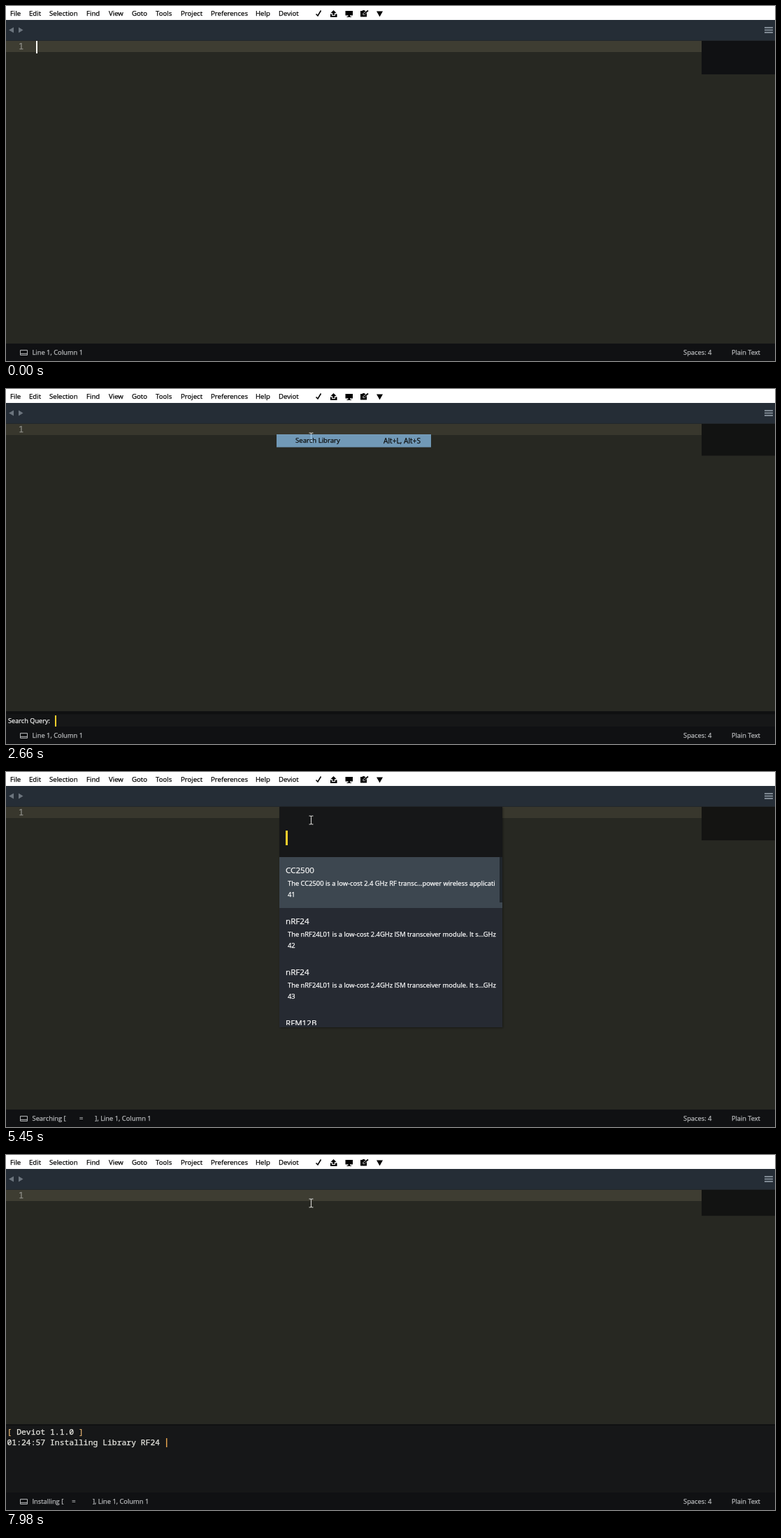
Recreate the animation shown at these times as an HTML page. Size 1100 by 509 pixels, loop 8000 ms.

```html
<!DOCTYPE html>
<html lang="en">
<head>
<meta charset="utf-8">
<title>Library search</title>
<style>
  html, body { margin: 0; width: 100%; height: 100%; overflow: hidden; background: #272822; }
  svg { display: block; width: 1100px; height: 509px; }
  text { font-family: "Open Sans", "Noto Sans", sans-serif; white-space: pre; stroke-width: .25px; }
  .mono { font-family: "Noto Sans Mono", "DejaVu Sans Mono", monospace; }
</style>
</head>
<body>
<svg id="stage" viewBox="0 0 1100 509" xmlns="http://www.w3.org/2000/svg">
  <defs>
    <filter id="shadow" x="-10%" y="-10%" width="120%" height="120%">
      <feDropShadow dx="1" dy="1" stdDeviation="1.5" flood-opacity=".4"/>
    </filter>
    <clipPath id="listClip"><rect x="391" y="122" width="311" height="241"/></clipPath>
  </defs>
</svg>
<script>
const LOOP = 8000;
const stage = document.getElementById('stage');

function add(parent, tag, attrs = {}, content) {
  const node = document.createElementNS('http://www.w3.org/2000/svg', tag);
  set(node, attrs);
  if (content !== undefined) node.textContent = content;
  parent.appendChild(node);
  return node;
}
function set(node, attrs) {
  for (const key in attrs) node.setAttribute(key, attrs[key]);
}
const group = (parent, attrs) => add(parent, 'g', attrs);
const rect = (parent, x, y, width, height, fill, more) =>
  add(parent, 'rect', { x, y, width, height, fill, ...more });
const path = (parent, d, attrs) => add(parent, 'path', { d, ...attrs });
// Text is placed by the middle of its capitals; a hairline in its own colour firms it up.
const label = (parent, x, mid, str, size, fill, more) =>
  add(parent, 'text', { x, y: mid + size * 0.36, 'font-size': size, fill, stroke: fill, ...more }, str);
const span = (parent, str, fill, more) => add(parent, 'tspan', { fill, stroke: fill, ...more }, str);

// Editor
rect(stage, 0, 20, 1100, 30, '#252d36');
rect(stage, 0, 49, 1100, 1, '#22272b');
rect(stage, 0, 50, 1100, 434, '#272822');
const activeLine = rect(stage, 0, 50, 1100, 16, '#3e3d32');
label(stage, 18, 58, '1', 12, '#90908a', { class: 'mono' });
const caret = rect(stage, 43, 50, 2, 18, '#f8f8f2');
const minimap = rect(stage, 995, 50, 105, 48, '#101113');
path(stage, 'M11 30.5V38.5L4 34.5ZM18 30.5V38.5L24.5 34.5Z', { fill: '#6c757e' });
path(stage, 'M1085 31H1097M1085 34.5H1097M1085 38H1097', { stroke: '#7f8993', 'stroke-width': 2 });

// Menu bar
rect(stage, 0, 0, 1100, 20, '#fff');
const hover = rect(stage, 384.5, 3.5, 40, 15.5, '#cce8ff', { stroke: '#99d1ff' });
const BAR = { File: 6, Edit: 33, Selection: 62, Find: 115, View: 147, Goto: 180, Tools: 214,
  Project: 250, Preferences: 293, Help: 357, Deviot: 390 };
for (const name in BAR) label(stage, BAR[name], 11, name, 9.6, '#000');
path(stage, 'M443.5 11.5L446 14L450.5 6.5', { fill: 'none', stroke: '#000', 'stroke-width': 1.6 });
path(stage, 'M468.5 6L472.5 10H470V13H467V10H464.5ZM464 11.5H466V14H471V11.5H473.5V16H464Z');
path(stage, 'M485.5 7H496V13.5H492V15H494V16H487.5V15H489.5V13.5H485.5Z');
path(stage, 'M507 7H510V6H513V7H516V15.5H507Z');
path(stage, 'M511 12.5L518 6', { stroke: '#fff', 'stroke-width': 3 });
path(stage, 'M511.5 12L518 6.5', { stroke: '#000', 'stroke-width': 1.8 });
path(stage, 'M530 7.5H539L534.5 15.5Z');

// Bottom panels
const UI = 9.35;
const queryPanel = group(stage);
rect(queryPanel, 0, 462, 1100, 24, '#131415');
rect(queryPanel, 0, 462, 1100, 4, '#0f1011');
rect(queryPanel, 67, 467, 1033, 17, '#161718');
label(queryPanel, 3, 475.5, 'Search Query:', 9.2, '#f0f0f0');
const queryText = label(queryPanel, 71, 476, '', 11.6, '#e4e4e4', { class: 'mono' });
const queryCaret = rect(queryPanel, 70, 468, 2, 16, '#ffcf2b');

const consolePanel = group(stage);
rect(consolePanel, 0, 386, 1100, 98, '#161718');
rect(consolePanel, 0, 386, 1100, 2, '#101112');
const MONO = { class: 'mono' };
const header = label(consolePanel, 1.5, 397, '', 11.4, '#e8e8e2', MONO);
span(header, '[', '#e6b673');
span(header, ' Deviot 1.1.0 ', '#e8e8e2');
span(header, ']', '#e6b673');
const logLine = group(consolePanel);
label(logLine, 1.5, 412, '01:24:57 Installing Library RF24 ', 11.4, '#e8e8e2', MONO);
rect(logLine, 229, 406, 1.5, 13, '#e0a04c');

// Status bar
rect(stage, 0, 484, 1100, 25, '#101113');
path(stage, 'M20.5 493.5H30.5V500.5H20.5ZM20.5 498.5H30.5', { fill: 'none', stroke: '#b4b6b8' });
const status = label(stage, 37.5, 497, '', UI, '#b9bbbd');
label(stage, 969, 497, 'Spaces: 4', UI, '#b9bbbd');
label(stage, 1038, 497, 'Plain Text', 9.2, '#b9bbbd');

// Drop-down menu: [middle, name, shortcut or '>' for a submenu, disabled]
const MENU = [
  [30.5, 'Select board(s)', '>'], [49, 'Select Environment', '', true],
  [74, 'Search Library', 'Alt+L, Alt+S'], [92.5, 'Remove Library', 'Alt+L, Alt+R'],
  [111.5, 'Import Library', '>'], [130, 'Examples', '>'], [149, 'Library Options', '>'],
  [173.5, 'Build', 'Alt+D, Alt+B'], [192, 'Upload', 'Alt+D, Alt+U'],
  [211, 'Clean', 'Alt+D, Alt+C', true], [230, 'Hide Deviot Console', ''],
  [254, 'Serial Port(s)', '>'], [273, 'Monitor Serial', '>'],
  [298, 'Option', '>'], [316.5, 'Language', '>'], [335, 'Donate', ''], [354, 'About', '>']
];
function menuItem(parent, [mid, name, extra, disabled]) {
  const fill = disabled ? '#6d6d6d' : '#000';
  label(parent, name === 'Donate' ? 427 : 414, mid, name, 9.6, fill);
  if (extra === '>')
    path(parent, `M597.5 ${mid - 3}L600.5 ${mid}L597.5 ${mid + 3}`, { fill: 'none', stroke: '#222' });
  else label(parent, 593, mid, extra, 10.2, fill, { 'text-anchor': 'end' });
}
const menu = group(stage);
rect(menu, 384.5, 20, 226, 345.5, '#f2f2f2', { stroke: '#ccc', filter: 'url(#shadow)' });
const selected = rect(menu, 387, 65, 221, 18.5, '#91c9f7');
for (const y of [61.5, 161.5, 242.5, 285.5]) rect(menu, 411, y, 197, 1, '#c4c4c4');
MENU.forEach(item => menuItem(menu, item));
path(menu, 'M419 339.5L414.8 335C412.8 332 417 329.5 419 332.5C421 329.5 425.2 332 423.2 335Z');

// Quick panel: [before match, matched, after match, description, id]
const CC = ['', '', 'CC2500', 'The CC2500 is a low-cost 2.4 GHz RF transc...power wireless applicati', '41'];
const NRF_TEXT = 'The nRF24L01 is a low-cost 2.4GHz ISM transceiver module. It s...GHz';
const RF24 = ['RF24', 'Optimized High Speed Driver for nRF24L0... 2.4GHz Wireless Transcei', '433'];
const NETWORK = ['RF24Network', 'Optimized Network Layer for nRF24L01(+) Radios', '435'];
const RFM = ['RFM12B', 'Library for the RFM12B low-cost wireless transceiver module', '44'];
const RFM69 = ['RFM69', 'Library for RFM69 radios', '46'];
const hit = ([name, ...rest], n) => ['', name.slice(0, n), name.slice(n), ...rest];
const nrf = (n, id) => ['n', 'RF2'.slice(0, n), 'RF24'.slice(n), NRF_TEXT, id];
const LISTS = {
  '': [CC, nrf(0, '42'), nrf(0, '43'), hit(RFM, 0)],
  r: [RF24, NETWORK, RFM, RFM69].map(row => hit(row, 1)),
  rf: [RF24, NETWORK, RFM, RFM69].map(row => hit(row, 2)),
  rf2: [hit(RF24, 3), hit(NETWORK, 3), nrf(3, '42'), nrf(3, '43')]
};
const CARET_X = { '': 400, r: 406, rf: 411, rf2: 420 };
const quick = group(stage);
rect(quick, 391, 50, 319, 316, '#252a31', { filter: 'url(#shadow)' });
rect(quick, 391, 50, 319, 72, '#161718');
rect(quick, 391, 122, 319, 73, '#3d4750');
const thumb = rect(quick, 706, 122, 4, 65, '#1f252b');
const filterText = label(quick, 401.5, 95.5, '', 14.3, '#d4d6d8');
const filterCaret = rect(quick, 400, 84, 3, 21, '#ffcf2b');
const lists = {};
for (const key in LISTS) {
  lists[key] = group(quick, { 'clip-path': 'url(#listClip)' });
  LISTS[key].forEach(([before, match, after, text, id], i) => {
    const y = 73 * i;
    const title = label(lists[key], 400, 140.5 + y, '', 11.6, '#f8f8f8');
    span(title, before, '#f8f8f8');
    span(title, match, i ? '#1890fb' : '#ffe41c', { 'font-weight': 700 });
    span(title, after, '#f8f8f8');
    label(lists[key], 403, 159.5 + y, text, UI, '#fff');
    label(lists[key], 403, 175.5 + y, id, UI, '#fff');
  });
}

// Pointers
const arrow = path(stage, 'M0 0V13.5L3 10.8L5 15.5L7.3 14.5L5.3 10H9.5Z',
  { fill: '#fff', stroke: '#111', 'stroke-width': 1.2, 'paint-order': 'stroke' });
const beam = path(stage, 'M-3 -6H-1L0 -5L1 -6H3M0 -5V5M-3 6H-1L0 5L1 6H3',
  { fill: 'none', stroke: '#d4d4d0', 'stroke-width': 1.1 });

// The chosen menu entry lingers for a moment.
const ghost = group(stage);
rect(ghost, 387, 65, 221, 18.5, '#91c9f7');
menuItem(ghost, MENU[2]);

const START = { caret: 1, focus: 1, arrow: null, beam: null, hover: 0, menu: 0, selected: 0, ghost: 0,
  query: null, queryCaret: 1, console: 0, log: 0, verb: '', spin: null,
  quick: 0, filter: '', filterCaret: 1, thumb: 1, thumbSize: 65, map: '#101113' };
const STEPS = [
  [0, {}], [360, { caret: .5 }], [480, { caret: 0 }], [850, { caret: .5 }],
  [970, { caret: 1, beam: [450, 90] }],
  [1090, { beam: null, arrow: [421, 32] }],
  [1210, { arrow: [411.5, 10], hover: 1 }],
  [1330, { caret: .8, menu: .5 }], [1450, { caret: 0, menu: 1 }],
  [1940, { caret: .5, arrow: [415, 22], selected: 30.5 }],
  [2060, { caret: 1, arrow: [425, 47], selected: 49 }],
  [2180, { arrow: [435, 67], selected: 74 }],
  [2300, { arrow: [436, 69] }], [2420, { caret: .5 }],
  [2540, { menu: 0, hover: 0, selected: 0, arrow: null, beam: [436.5, 69], ghost: 1,
    focus: 0, query: '', map: '#121312' }],
  [2660, { ghost: .7 }], [2780, { ghost: .3 }], [2900, { ghost: 0 }],
  [3140, { queryCaret: .5 }], [3260, { queryCaret: 0 }], [3750, { queryCaret: .5 }],
  [3870, { query: 'r', queryCaret: 1 }], [4120, { query: 'rf' }],
  [4490, { query: null, focus: 1, caret: 1, map: '#141412' }],
  [4610, { verb: 'Searching', spin: 4610 }], [4730, {}], [4850, {}],
  [4970, { caret: .5 }], [5090, { caret: 0 }],
  [5210, { focus: 0, quick: .5 }], [5330, { quick: 1 }], [5450, {}],
  [5570, { verb: 'Done', spin: null, beam: null, arrow: [435, 69.5] }],
  [5820, { filterCaret: .5, thumb: .5 }], [5940, { filterCaret: 0, thumb: 0 }],
  [6060, { filter: 'r', filterCaret: 1, thumb: 1, thumbSize: 73 }], [6180, {}],
  [6430, { filter: 'rf' }], [6670, { filter: 'rf2' }],
  [7040, { filterCaret: .5, thumb: .5 }], [7160, { filterCaret: 0, thumb: 0 }],
  [7410, { quick: .4, focus: 1, caret: 1, arrow: null, beam: [436.5, 69], verb: '' }],
  [7530, { quick: 0, verb: 'Installing', spin: 7480 }],
  [7650, { console: .5, map: '#121312' }], [7770, { console: 1 }],
  [7890, { caret: .5, log: 1 }], [7980, { caret: 0 }]
];

const fade = (node, opacity) => set(node, { opacity });
function place(node, point) {
  fade(node, point ? 1 : 0);
  if (point) set(node, { transform: `translate(${point})` });
}
function statusLine(s, time) {
  const position = 'Line 1, Column 1';
  if (!s.verb) return position;
  if (s.spin === null) return `${s.verb}, ${position}`;
  const before = Math.floor((time - s.spin) / 100);
  return `${s.verb} [${' '.repeat(before)}=${' '.repeat(15 - before)}], ${position}`;
}

function draw(index) {
  const s = Object.assign({}, START, ...STEPS.slice(0, index + 1).map(step => step[1]));
  const panelHeight = s.query !== null ? 22 : 98 * s.console;
  fade(caret, s.focus ? s.caret : 0);
  set(activeLine, { fill: s.focus ? '#3e3d32' : '#38372d' });
  set(minimap, { height: (434 - panelHeight) / 434 * 48, fill: s.map });
  fade(hover, s.hover);
  fade(menu, s.menu);
  set(selected, { y: s.selected - 9, opacity: s.selected ? 1 : 0 });
  fade(ghost, s.ghost);

  fade(queryPanel, s.query !== null ? 1 : 0);
  queryText.textContent = s.query || '';
  set(queryCaret, { x: 70 + 7 * (s.query || '').length, opacity: s.queryCaret });
  set(consolePanel, { opacity: s.console ? 1 : 0, transform: `translate(0 ${98 - 98 * s.console})` });
  fade(logLine, s.log);
  status.textContent = statusLine(s, STEPS[index][0]);

  fade(quick, s.quick);
  filterText.textContent = s.filter;
  set(filterCaret, { x: CARET_X[s.filter], opacity: s.filterCaret });
  set(thumb, { height: s.thumbSize, opacity: s.thumb });
  for (const key in lists) fade(lists[key], key === s.filter ? 1 : 0);

  place(arrow, s.arrow);
  place(beam, s.beam);
}

const begin = performance.now();
let shown = -1;
function tick() {
  const time = (performance.now() - begin) % LOOP;
  const next = STEPS.findIndex(step => step[0] > time);
  const index = (next < 0 ? STEPS.length : next) - 1;
  if (index !== shown) draw(shown = index);
  requestAnimationFrame(tick);
}
tick();
</script>
</body>
</html>
```
